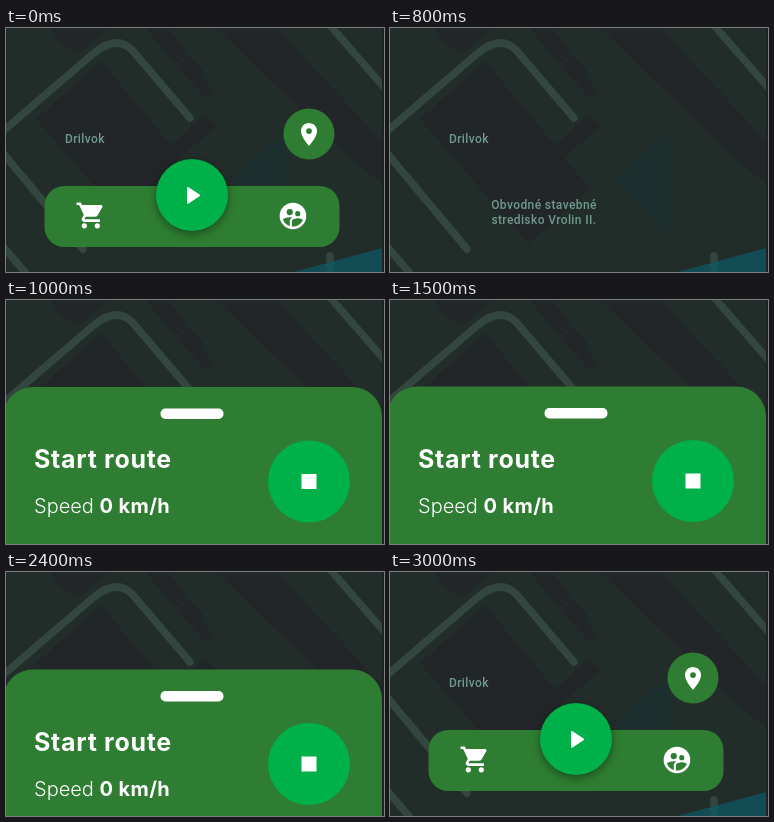
Animation of 378x244 px, one loop 4.2 s. Source, as an HTML page:

```html
<!DOCTYPE html>
<html lang="en">
<head>
<meta charset="utf-8">
<title>Route panel</title>
<style>
  html, body { margin: 0; width: 100%; height: 100%; overflow: hidden; background: #222d2a; }
  svg { display: block; width: 100vw; height: 100vh; }

  .building { fill: #222628; }
  .road { fill: none; stroke: #33463f; stroke-width: 7.5; stroke-linecap: round; stroke-linejoin: round; }
  .label { fill: #6f9a8b; font: 500 12px Roboto, sans-serif; letter-spacing: .4px; }
  .green { fill: #2e7d32; }
  .bright { fill: #00b048; }
  .white { fill: #fff; }
  .raised { filter: drop-shadow(0 3px 4px rgba(0, 0, 0, .4)); }
  .title { font: 700 25px Inter, sans-serif; letter-spacing: .7px; }
  .speed { font: 300 20px Inter, sans-serif; }
  .value { font-weight: 700; letter-spacing: .4px; }

  .panel { animation: slide 4.2s step-end infinite; }
  .menu { animation: toggle 4.2s step-end infinite; }

  /* The panel decelerates upwards, then accelerates down in 100 ms steps. */
  @keyframes slide {
    0%     { transform: translateY(170px); }
    21.42% { transform: translateY(34px); }
    23.8%  { transform: translateY(.5px); }
    26.19% { transform: translateY(0); }
    52.38% { transform: translateY(1px); }
    54.76% { transform: translateY(4px); }
    57.14% { transform: translateY(11px); }
    59.52% { transform: translateY(22px); }
    61.9%, 100% { transform: translateY(170px); }
  }
  @keyframes toggle {
    0%     { visibility: visible; }
    19.04% { visibility: hidden; }
    59.52%, 100% { visibility: visible; }
  }
</style>
</head>
<body>
<svg viewBox="0 0 378 244" preserveAspectRatio="none">
  <g class="map">
    <rect width="378" height="244" fill="#222d2a"/>
    <path fill="#1c2e2e" d="M280 101V208L224 153Z"/>
    <g class="building">
      <path d="M95 33L165 117L199 87L211 98L174 130L201 161L138 216L30 91Z"/>
      <path d="M45 0L48 10L72 26L102 0Z"/>
      <path d="M140 0L169 37L182 26L162 0Z"/>
      <path d="M170 39L184 27L198 44L196 48L207 63L200 70Z"/>
      <path d="M210 0H270L378 115V158L342 128Z"/>
    </g>
    <g class="road">
      <path d="M-4 104L88 25Q111 6 127 23L184 90"/>
      <path d="M-4 124L77 221"/>
      <path d="M-4 217L22 248"/>
      <path d="M321 -6L382 64"/>
      <path d="M324 228V250"/>
    </g>
    <path fill="#0d5865" fill-opacity=".75" d="M288 244L378 219.5V244Z"/>
    <text class="label" x="59" y="114.5">Drilvok</text>
    <g class="label" text-anchor="middle">
      <text x="154" y="181">Obvodné stavebné</text>
      <text x="154" y="196">stredisko Vrolin II.</text>
    </g>
  </g>

  <g class="panel">
    <path class="green" d="M-3 260V116.4A30 30 0 0 1 27 86.4H346A30 30 0 0 1 376 116.4V260Z"/>
    <rect class="white" x="154.5" y="108" width="63" height="10.5" rx="5"/>
    <text class="white title" x="28" y="167.5">Start route</text>
    <text class="white speed" x="28" y="212.5">Speed</text>
    <text class="white speed value" x="93.5" y="212.5">0 km/h</text>
    <circle class="bright" cx="303" cy="181" r="41"/>
    <rect class="white" x="295.5" y="173.5" width="15" height="15"/>
  </g>

  <g class="menu">
    <circle class="green" cx="303" cy="106" r="25.5"/>
    <path class="white" transform="translate(289.2 92.7) scale(1.15)"
      d="M12 2C8.13 2 5 5.13 5 9c0 5.25 7 13 7 13s7-7.75 7-13c0-3.87-3.13-7-7-7zm0 9.5a2.5 2.5 0 1 1 0-5 2.5 2.5 0 0 1 0 5z"/>

    <rect class="green" x="38.5" y="158" width="295" height="61" rx="20"/>
    <g class="white" transform="translate(69.2 171.8) scale(1.3)">
      <circle cx="7" cy="20" r="2"/>
      <circle cx="17" cy="20" r="2"/>
      <path d="M1 2v2h2l3.6 7.59-1.35 2.45C4.5 15.4 5.5 17 7 17h12v-2H7.42c-.2 0-.3-.2-.22-.37l.9-1.63h7.45c.75 0 1.41-.41 1.75-1.03l3.58-6.49A1 1 0 0 0 20 4H5.21l-.94-2z"/>
    </g>
    <g class="green" transform="translate(271 172) scale(1.33)">
      <circle class="white" cx="12" cy="12" r="10"/>
      <circle cx="9.6" cy="9.1" r="2.36"/>
      <circle cx="15.6" cy="10.27" r="1.93"/>
      <path d="M9.6 15.9v3.75C7.2 18.9 5.3 17 4.46 14.68c1.05-1.12 3.67-1.69 5.14-1.69.53 0 1.2.08 1.9.22-1.64.87-1.9 2.02-1.9 2.68z"/>
      <path d="M12 20l-.79-.04v-4.07c0-1.42 2.94-2.13 4.4-2.13 1.07 0 2.92.39 3.84 1.15C18.28 17.88 15.4 20 12 20z"/>
    </g>

    <circle class="bright raised" cx="186" cy="167" r="36"/>
    <path class="white" stroke="#fff" stroke-width="2" stroke-linejoin="round" d="M182 160L193 167.3L182 174.6Z"/>
  </g>

  <rect x="376" width="2" height="244" fill="#1d2324"/>
</svg>
</body>
</html>
```
